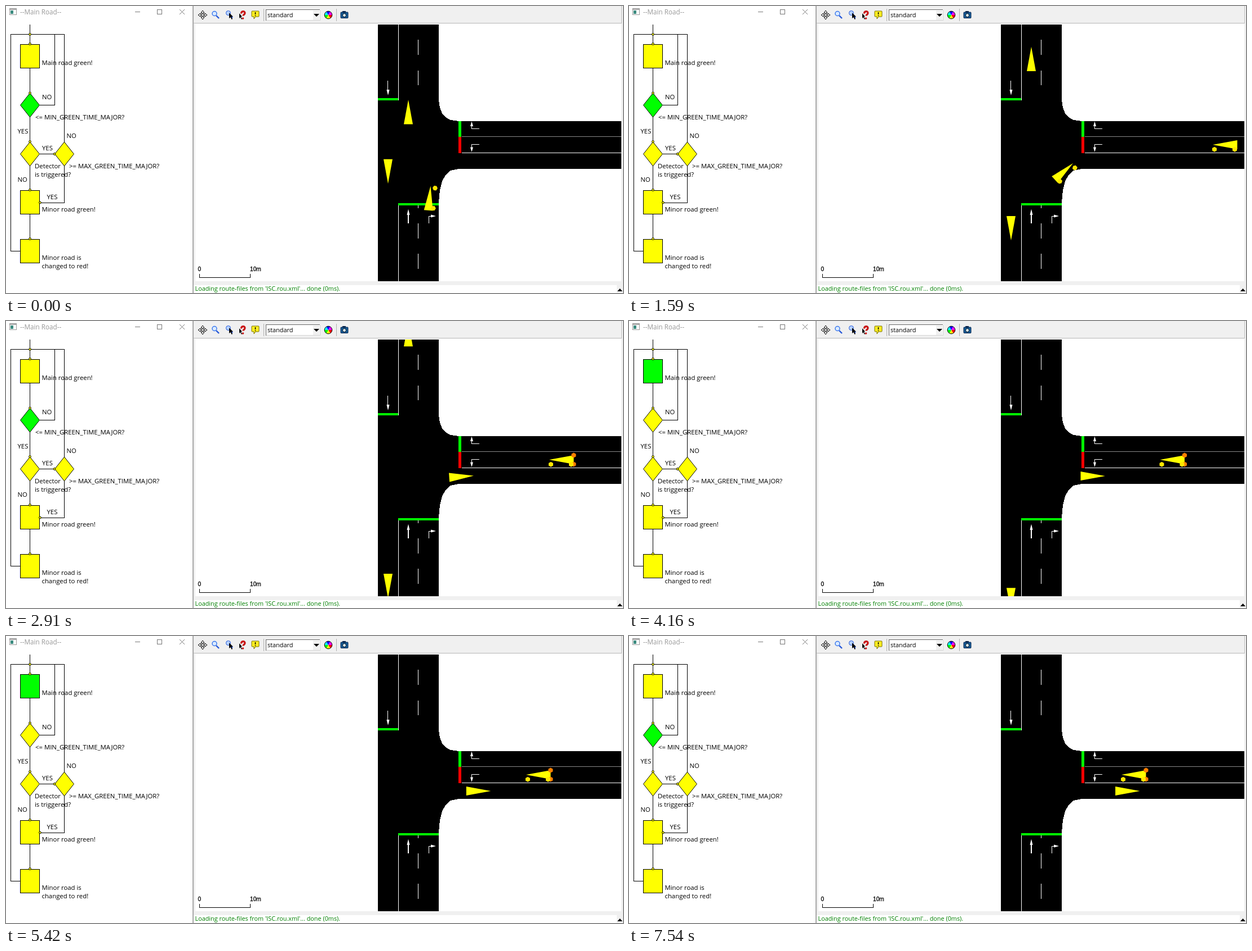
An HTML page that plays this animation: 1095 by 511 pixels, repeating every 8 s.

```html
<!DOCTYPE html>
<html lang="en">
<head>
<meta charset="utf-8">
<title>Junction control</title>
<style>
  html, body { margin: 0; width: 100%; height: 100%; overflow: hidden; background: #fff; }
  svg { display: block; width: 100%; height: 100%; }
  text { font: 11.35px "Open Sans", "Noto Sans", sans-serif; fill: #000; white-space: pre; }
  .scale { font: 10.2px "Liberation Sans", sans-serif; stroke: #000; stroke-width: .3; }
  .crisp { shape-rendering: crispEdges; }
  .line { fill: none; stroke: #000; }
  .mark { fill: none; stroke: #fff; }
  .node { fill: #ff0; stroke: #000; }
</style>
</head>
<body>
<svg viewBox="0 0 1095 511" preserveAspectRatio="none">
  <defs>
    <clipPath id="view"><rect x="336" y="33" width="756" height="457"/></clipPath>
    <clipPath id="log"><rect x="333" y="499" width="750" height="12"/></clipPath>
  </defs>
  <rect width="1095" height="511" fill="#fff"/>

  <!-- flow chart window -->
  <g class="crisp">
    <rect x="6.5" y="4.5" width="12" height="11" fill="#fff" stroke="#999"/>
    <rect x="7" y="5" width="11" height="2" fill="#aaa"/>
    <rect x="8" y="8" width="5" height="6" fill="#3c8c80"/>
    <path d="M229 10.5h9M268.5 6.5h8v8h-8z" fill="none" stroke="#777"/>
  </g>
  <path d="M308 6l9 9M317 6l-9 9" stroke="#777" fill="none"/>
  <text x="25" y="15" style="font-size:11.7px;fill:#999">--Main Road--</text>
  <path class="line crisp" d="M42.5 33V415M25 436.5H8.5V50.5H103.5V350.5H60M60 176.5H86.5V50M60 263.5H86"/>
  <g id="nodes"></g>
  <g id="labels"></g>

  <!-- simulator window -->
  <g class="crisp">
    <rect x="331" width="764" height="511" fill="#f0f0f0"/>
    <rect x="331" width="2" height="511" fill="#a8a8a8"/>
    <rect x="336" y="32" width="756" height="458" fill="#fff"/>
    <path d="M333 30.5H1092.5V0" fill="none" stroke="#c0c0c0"/>
    <rect x="333" y="497" width="762" height="14" fill="#fff"/>
    <rect x="1084" y="497" width="11" height="14" fill="#f0f0f0"/>
    <path d="M457.5 5V27M586.5 5V27" stroke="#b0b0b0"/>
    <rect x="461" y="6" width="97" height="20" fill="#fff"/>
    <path d="M461.5 26V6.5H557" fill="none" stroke="#696969"/>
    <path d="M462 25.5H557.5V7" fill="none" stroke="#d4d4d4"/>
    <rect x="545" y="8" width="11" height="17" fill="#f0f0f0"/>
  </g>
  <path d="M546 14h10l-5 5zM1085 508h9l-4.500-5z"/>
  <text x="464" y="20" style="font-size:10.9px">standard</text>
  <g clip-path="url(#log)">
    <text x="335.5" y="507" style="font-size:10.85px;fill:#008000">Loading route-files from 'ISC.rou.xml'... done (0ms).</text>
  </g>

  <!-- toolbar icons -->
  <path d="M349 8l3 4h-2v3h3v-2l4 3-4 3v-2h-3v3h2l-3 4-3-4h2v-3h-3v2l-4-3 4-3v2h3v-3h-2z" fill="#fff" stroke="#000"/>
  <g fill="none">
    <path d="M373 17l5 5" stroke="#2456d8" stroke-width="2.4"/>
    <circle cx="370" cy="13.5" r="4" fill="#dcecff" stroke="#3a78ee" stroke-width="1.5"/>
    <path d="M397 15l5 6" stroke="#2456d8" stroke-width="2"/>
    <circle cx="394.5" cy="12.5" r="4" fill="#b8d4ff" stroke="#2456d8"/>
    <path d="M396 12v10l2.500-2 2 4 1.500-1-2-4h3z" fill="#000"/>
    <path d="M417.500 13.500c0-5 6.500-5 6.500-1 0 2.500-3 3-3 5" stroke="#c81414" stroke-width="3.2"/>
    <circle cx="420.5" cy="22" r="1.8" fill="#c81414"/>
    <path d="M414 13v9l2-2 2 4 1-1-2-4h2z" fill="#000"/>
    <path d="M437 9h11q1 0 1 1v8q0 1-1 1h-5l-3 4v-4h-3q-1 0-1-1v-8q0-1 1-1z" fill="#ffee20" stroke="#777200"/>
    <path d="M442.500 11v4M442.500 16.500v1.500" stroke="#000" stroke-width="1.5"/>
  </g>
  <g id="wheel"></g>
  <rect x="594" y="11" width="13" height="10.5" rx="1" fill="#145a96" stroke="#0a2850"/>
  <rect x="597" y="9" width="6" height="3" fill="#0a2850"/>
  <circle cx="600.5" cy="16.5" r="3" fill="#d8efff" stroke="#000"/>

  <!-- junction -->
  <g clip-path="url(#view)">
    <path class="crisp" d="M660 33H768V168L770 181 774 191 780 198 789 203 803 205H1092V290H803L789 293 780 301 774 312 770 328 768 349V490H660z"/>
    <g class="crisp">
      <path class="mark" d="M696.5 33V168M696.5 351V490M809 261.5H1092"/>
      <path class="mark" d="M731.5 60V87M731.5 115V141M731.5 355V360M731.5 387V414M731.5 441V468"/>
      <path d="M809 232.5H1092" stroke="#888"/>
      <path class="mark" d="M677.5 133V150M750.5 387V374H756M840 218H826.5V212M840 246.5H826.5V252"/>
      <path class="mark" d="M714 387V372" stroke-width="2"/>
      <path d="M660 164h36v4h-36zM696 351h72v4h-72zM803 205h5v28h-5z" fill="#0f0"/>
      <path d="M803 233h5v29h-5z" fill="#f00"/>
    </g>
    <path fill="#fff" d="M675.500 149h5l-2.500 10zM711.500 372h5l-2.500-10.500zM754 371.500v5l9-2.500zM824 214h5l-2.500-8.500zM824 251.500h5l-2.500 8.500z"/>
    <g id="cars"></g>
  </g>
  <path class="line crisp" d="M343.5 477V483.5H433.5V477"/>
  <text class="scale" x="340.5" y="472">0</text>
  <text class="scale" x="433" y="472">10m</text>
</svg>
<script>
const LOOP = 8000;
const $ = id => document.getElementById(id);

function add(parent, tag, attrs, text) {
  const el = document.createElementNS('http://www.w3.org/2000/svg', tag);
  for (const key in attrs) el.setAttribute(key, attrs[key]);
  if (text) el.textContent = text;
  parent.appendChild(el);
  return el;
}

// Flow chart
const box = y => add($('nodes'), 'rect',
  { x: 25.5, y: y + .5, width: 34, height: 42, class: 'node crisp' });
const diamond = (x, y) => add($('nodes'), 'path',
  { d: `M${x} ${y - 21.5}l17 21.500-17 21.500-17-21.500z`, class: 'node' });

const mainBox = box(68), minCheck = diamond(42.5, 176.5), detector = diamond(42.5, 263.5);
diamond(103.5, 263.5);
box(328);
box(415);
for (const [x, y] of [[42.5, 50.5], [42.5, 67.5], [42.5, 155], [42.5, 241.5], [42.5, 327.5], [42.5, 414.5], [86, 263.5], [60.5, 350]])
  add($('nodes'), 'circle', { cx: x, cy: y, r: 1.9, class: 'node' });

for (const [x, y, label] of [
  [63.5, 105, 'Main road green!'], [64, 166, 'NO'], [52, 202, '<= MIN_GREEN_TIME_MAJOR?'],
  [20.5, 227, 'YES'], [107.5, 235, 'NO'], [64, 257, 'YES'], [51, 289, 'Detector'],
  [51, 304, 'is triggered?'], [112, 289, '>= MAX_GREEN_TIME_MAJOR?'], [20.5, 313, 'NO'],
  [72.5, 344, 'YES'], [63.5, 366, 'Minor road green!'], [63.5, 452, 'Minor road is'],
  [63.5, 467, 'changed to red!']
]) add($('labels'), 'text', { x, y }, label);

// Colour wheel
for (let i = 0; i < 6; i++) {
  const at = a => `${572 + 6.5 * Math.cos(a)} ${16 + 6.5 * Math.sin(a)}`;
  const a = i * Math.PI / 3;
  add($('wheel'), 'path', { d: `M572 16L${at(a)}A6.500 6.500 0 0 1 ${at(a + Math.PI / 3)}z`, fill: `hsl(${i * 60},95%,50%)` });
}
add($('wheel'), 'circle', { cx: 572, cy: 16, r: 6.8, fill: 'none', stroke: '#000' });

// Vehicles: nose at the origin, pointing up
function makeCar(side) {
  const g = add($('cars'), 'g', {});
  const lamp = (parent, x, y, fill) => add(parent, 'path',
    { d: `M${x - 4.5} ${y}l2.250-4h4.500l2.250 4-2.250 4h-4.500z`, fill });
  add(g, 'path', { d: 'M0 0L8 43.500H-8z', fill: '#ff0' });
  const brake = add(g, 'g', {}), blink = add(g, 'g', {});
  for (const s of [-8, 8]) lamp(brake, s, 43.5, '#ff8000');
  for (const y of [3, 39]) lamp(blink, side * 8.3, y, '#ffe600');
  return (x, y, angle, blinking, braking) => {
    g.setAttribute('transform', `translate(${x} ${y}) rotate(${angle})`);
    blink.style.display = blinking ? '' : 'none';
    brake.style.display = braking ? '' : 'none';
  };
}
const north = makeCar(1), south = makeCar(1), turning = makeCar(1), west = makeCar(-1);

// Simulation step times, and poses per step
const STEPS = [0, 330, 790, 1190, 1590, 2050, 2450, 2910, 4160, 5420, 6680, 7140, 7540];
const TURN = [[753.5, 320.5, 5], [757.5, 307, 10], [764, 294, 17], [775, 285, 32],
              [788, 280, 48], [802.5, 276.5, 64], [816, 275, 77], [830, 275.5, 86]];
const WEST = [1190, 1160, 1085, 1061, 1036, 1010, 986, 964, 942.5, 923, 904.5, 889, 874];

// Active chart node: switch time, node
const ACTIVE = [[0, minCheck], [3700, detector], [4160, mainBox], [4560, minCheck], [5020, detector],
                [5420, mainBox], [5880, minCheck], [6280, detector], [6680, mainBox], [7140, minCheck]];

function render(t) {
  const k = STEPS.filter(s => s <= t).length - 1;
  north(714, 167 - 23.6 * k, 0);
  south(678, 316.3 + 25.3 * k, 180);
  const [x, y, angle] = TURN[k] || [845 + 15.4 * (k - 8), 276, 90];
  turning(x, y, angle, k < 7, false);
  west(WEST[k], 247, -90, true, k > 5);

  const active = ACTIVE.filter(a => a[0] <= t).pop()[1];
  for (const n of [mainBox, minCheck, detector]) n.style.fill = n === active ? '#0f0' : '#ff0';
}

const start = performance.now();
function tick() {
  render((performance.now() - start) % LOOP);
  requestAnimationFrame(tick);
}
render(0);
requestAnimationFrame(tick);
</script>
</body>
</html>
```
